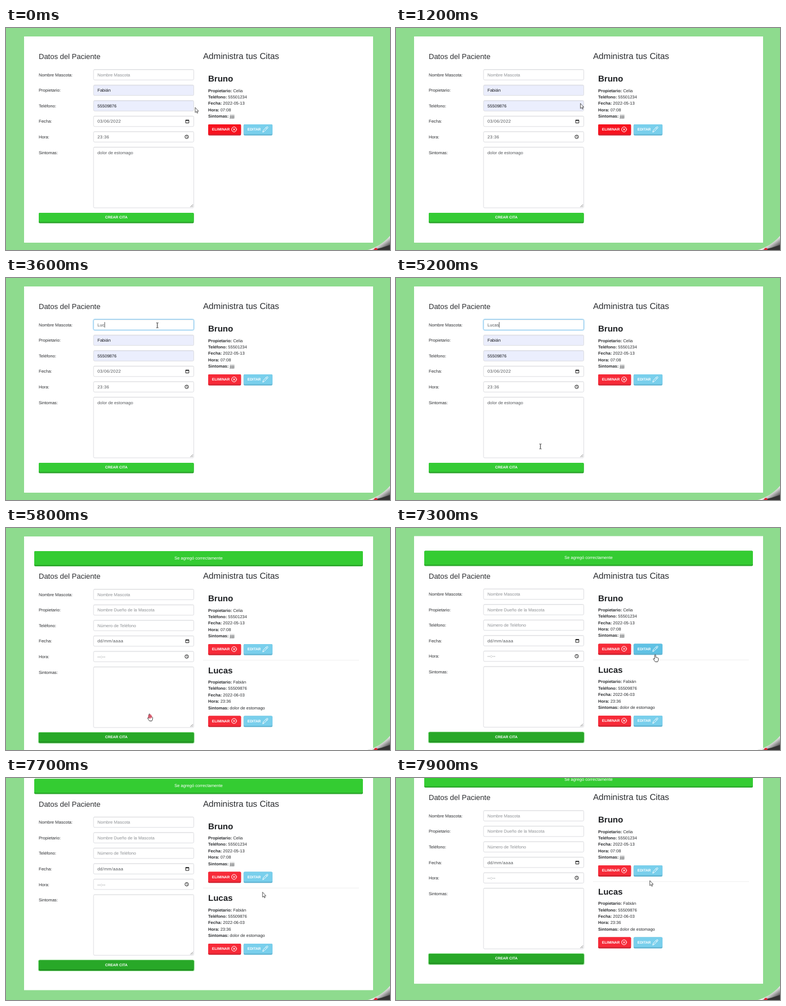
These frames come from a looping animation (680x394 px, 8000 ms). An HTML page:

```html
<!DOCTYPE html>
<html lang="es">
<head>
<meta charset="utf-8">
<title>Citas</title>
<style>
html, body { margin: 0; width: 100%; height: 100%; overflow: hidden; background: #8edb8e; }
svg { display: block; width: 680px; height: 394px; }
text { font: 7.6px "Liberation Sans", Arial, sans-serif; fill: #2b2d30; text-rendering: geometricPrecision; white-space: pre; }
.h1 { font-size: 13px; }
.h2 { font-size: 15.15px; }
.pet { font-size: 15px; font-weight: bold; fill: #1f2124; }
.info { font-size: 7.5px; }
.info tspan { font-weight: bold; }
.btn { font-size: 6.5px; font-weight: bold; fill: #fff; }
.value { fill: #55585c; }
.hint { fill: #8c8f93; }
.auto { fill: #16181c; }
.time { letter-spacing: .36px; }
.white { fill: #fff; }
.menu { font-size: 7.1px; fill: #f1f1f2; }
.field { fill: #fff; stroke: #dcdde1; stroke-width: 1; }
.line { fill: none; stroke: #fff; stroke-width: 1; stroke-linecap: round; stroke-linejoin: round; }
.icon { fill: none; stroke: #222; stroke-width: 1; }
</style>
</head>
<body>
<svg id="stage" viewBox="0 0 680 394" xmlns="http://www.w3.org/2000/svg"></svg>
<script>
const LOOP = 8000, STEP = 100, ADDED = 5700, SHIFT = 35;
const ROW = 27.55;

const text = (x, y, s, cls = '', extra = '') => `<text x="${x}" y="${y}" class="${cls}" ${extra}>${s}</text>`;
const rect = (x, y, w, h, extra = '') => `<rect x="${x}" y="${y}" width="${w}" height="${h}" ${extra}/>`;

// Button with a darker lower edge
const button = (x, y, w, h, fill, edge, cls = '') =>
  rect(x, y, w, h, `rx="2" fill="${edge}" class="${cls}-edge"`) +
  rect(x, y, w, h - 2.4, `rx="2" fill="${fill}" class="${cls}"`);

function card(y, pet, details, cls) {
  const names = ['Propietario', 'Teléfono', 'Fecha', 'Hora', 'Sintomas'];
  const rows = names.map((n, i) =>
    text(358, 113.6 + i * 11.35, `<tspan>${n}:</tspan> ${details[i]}`, 'info')).join('');
  return `<g transform="translate(0 ${y})">${text(358, 95.3, pet, 'pet')}${rows}
    ${button(358, 171, 58.2, 19.8, '#f72a38', '#cf2431', 'del')}
    ${text(364.8, 182.2, 'ELIMINAR', 'btn')}
    <g class="line"><circle cx="403.9" cy="180" r="4.4"/><path d="M402.3 178.4l3.2 3.2m0-3.2l-3.2 3.2"/></g>
    ${button(420.8, 171, 51, 19.8, '#79cfec', '#62b5d3', cls)}
    ${text(427.6, 182.2, 'EDITAR', 'btn')}
    <path class="line" d="M454.8 184.6l.8-3 6-6q1-.8 1.8 0 .9.9 0 1.8l-6 6zM460.4 176.8l1.9 1.9"/></g>`;
}

function form() {
  const labels = ['Nombre Mascota:', 'Propietario:', 'Teléfono:', 'Fecha:', 'Hora:', 'Sintomas:'];
  let out = text(58, 55.2, 'Datos del Paciente', 'h1') + text(349, 55.4, 'Administra tus Citas', 'h2');
  labels.forEach((label, i) => {
    const y = 73.6 + i * ROW;
    out += text(58, y + 12.2, label);
    out += rect(155, y, 177.5, i < 5 ? 18.6 : 107.8, `rx="2" class="field" id="box${i}"`);
    out += `<path d="M156 ${y + .9}h175.5" stroke="#000" stroke-opacity=".05"/>`;
    out += text(162, y + 12.2, '', '', `id="val${i}"`);
  });
  return out + rect(162, 78.2, .8, 9.8, 'id="caret" fill="#333"') +
    `<g class="icon"><path d="M318.2 163.4h5.6v5.2h-5.6z"/><path d="M318 163.8h6" stroke-width="1.8"/>
      <circle cx="320" cy="193.1" r="3.1"/><path d="M320 191v2.3l1.5.9" stroke-width=".8"/>
      <path d="M326.5 317.8l4.6-4.6m-2 4.6l2-2" stroke="#666" stroke-width=".8"/></g>` +
    rect(56.8, 327, 277, 20.6, 'rx="3" id="glow" fill="#9be79b"') +
    button(58, 328, 274.6, 18.4, '#34cb34', '#2ba52b', 'create') +
    text(195.4, 338.4, 'CREAR CITA', 'btn', 'text-anchor="middle"');
}

const stage = document.getElementById('stage');
stage.innerHTML = `
<defs>
  <linearGradient id="fold" gradientUnits="userSpaceOnUse" x1="657" y1="379" x2="668" y2="394">
    <stop offset="0" stop-color="#a9b3a9"/><stop offset=".28" stop-color="#f4f4f4"/>
    <stop offset=".6" stop-color="#aeaeae"/><stop offset="1" stop-color="#555"/>
  </linearGradient>
</defs>
${rect(0, 0, 680, 394, 'fill="#8edb8e"')}
<g id="page">
  ${rect(32, 15, 618, 366, 'fill="#fff" id="panel"')}
  <g id="alert">${button(50, 41, 582, 27, '#34cc32', '#2ba82b')}
    ${text(341, 55.7, 'Se agregó correctamente', 'white', 'text-anchor="middle"')}</g>
  <g id="content">${form()}
    ${card(0, 'Bruno', ['Celia', '55501234', '2022-05-13', '07:08', 'jjjjj'], 'edit')}
    <g id="second">${rect(349, 199.3, 276, .8, 'fill="#ececec"')}
      ${card(127.5, 'Lucas', ['Fabián', '55509876', '2022-06-03', '23:36', 'dolor de estomago'], 'edit2')}</g>
  </g>
  <g id="menu"><path d="M211 97h6l4-4 4 4h27.5q2 0 2 2v40q0 2-2 2H211q-2 0-2-2V99q0-2 2-2z" fill="#2a2b2f"/>
    ${text(215, 112, 'pedacito', 'menu')}${text(215, 131.4, 'Bruno', 'menu')}</g>
</g>
<g id="corner">
  <path d="M640 394Q663 388 680 369V394Z" fill="url(#fold)"/>
  <path d="M649 394Q664 391 680 385V394Z" fill="#333"/>
  <circle cx="655" cy="393" r="2.8" fill="#d8232f"/>
</g>
<g id="pointer">
  <path id="arrow" d="M0 0v9l2-1.8 1.4 3 1.4-.6-1.4-2.9h2.7z" fill="#fff" stroke="#333" stroke-width=".8"/>
  <path id="beam" d="M-1.8-4.4q1.5 0 1.8.7.3-.7 1.8-.7M0-3.7v7.4M-1.8 4.4q1.5 0 1.8-.7.3.7 1.8.7" fill="none" stroke="#222" stroke-width="1"/>
  <g id="hand"><path d="M-1 .5Q0-.8 1 .5v4l3.4.8q1.5.4 1.4 2l-.6 3.2-.9 2H.2L-3 8.2q-.8-1.5.6-1.7L-1 7.8z" fill="#fff" stroke="#333" stroke-width=".9"/></g>
  <circle id="click" cx="1" cy="4.5" r="3.5" fill="#e0304a" fill-opacity=".65"/>
</g>`;

const el = id => document.getElementById(id);
const show = (id, on) => el(id).setAttribute('display', on ? 'inline' : 'none');
const move = (id, x, y) => el(id).setAttribute('transform', `translate(${x} ${y})`);
const paint = (cls, fill) => document.querySelectorAll('.' + cls).forEach(e => e.setAttribute('fill', fill));
const within = (t, a, b) => t >= a && t < b;

// [time, x, y]
const path = [
  [0, 335, 141], [1000, 335, 141], [1900, 268, 84], [4500, 268, 84], [5400, 254, 330], [5800, 254, 330],
  [6500, 446, 238], [7000, 459, 225], [7300, 459, 225], [7400, 459, 223], [7500, 459, 223], [7900, 449.5, 182]
];
const shapes = [[0, 'arrow'], [1300, 'beam'], [5300, 'hand'], [6000, 'beam'], [6300, 'arrow'], [6700, 'hand'], [7400, 'arrow']];
const typing = [[0, ''], [2800, 'L'], [3100, 'Lu'], [3600, 'Luc'], [3700, 'Luca'], [3900, 'Lucas']];
const scroll = [[7200, 0], [7300, .6], [7400, 8.5], [7500, 19.4], [7600, 30], [7700, 39.5], [7800, 46.5], [7900, 50.9]];

const held = (table, t) => table.filter(k => k[0] <= t).pop()[1];

function tween(table, t, col, ease = u => u) {
  const i = table.findIndex(k => k[0] > t);
  if (i === 0) return table[0][col];
  if (i < 0) return table[table.length - 1][col];
  const a = table[i - 1], b = table[i];
  return a[col] + (b[col] - a[col]) * ease((t - a[0]) / (b[0] - a[0]));
}
const smooth = u => u * u * (3 - 2 * u);

const filled = [
  ['', 'value'], ['Fabián', 'auto'], ['55509876', 'auto'],
  ['03/06/2022', 'value time'], ['23:36', 'value time'], ['dolor de estomago', 'value']
];
const empty = [
  ['Nombre Mascota', 'hint'], ['Nombre Dueño de la Mascota', 'hint'], ['Número de Teléfono', 'hint'],
  ['dd/mm/aaaa', 'value time'], ['--:--', 'value time'], ['', 'value']
];

function draw(t) {
  const done = t >= ADDED, focus = within(t, 1700, 5600), name = held(typing, t);

  (done ? empty : filled).forEach(([s, cls], i) => {
    const v = el('val' + i);
    if (i === 0) [s, cls] = !done && name ? [name, 'value'] : empty[0];
    if (v.textContent !== s) v.textContent = s;
    v.setAttribute('class', cls);
  });
  for (const i of [1, 2]) el('box' + i).style.fill = done ? '#fff' : '#ebeefd';
  el('box0').style.stroke = focus ? '#86c5ec' : '';
  el('box0').style.filter = focus ? 'drop-shadow(0 0 1.2px #8ed0f5)' : '';

  const blink = within(t, 2600, 4400) || within(t, 4900, 5500);
  show('caret', blink);
  el('caret').setAttribute('x', 162.2 + (name && !done ? el('val0').getComputedTextLength() : 0));

  show('menu', within(t, 2000, 2800));
  show('alert', done);
  show('second', done);
  show('glow', done);
  paint('create', done ? '#28a828' : t >= 5400 ? '#2cb42c' : '#34cb34');
  paint('create-edge', done ? '#219021' : '#2ba52b');
  paint('del', t < 1500 ? '#f7131f' : '#f72a38');
  paint('edit', within(t, 6700, 7400) ? '#5fc1e4' : '#79cfec');

  el('panel').setAttribute('height', done ? 401 : 366);
  move('content', 0, done ? SHIFT : 0);
  move('page', 0, -tween(scroll, t, 1));
  move('pointer', tween(path, t, 1, smooth), tween(path, t, 2, smooth));
  const shape = held(shapes, t);
  for (const id of ['arrow', 'beam', 'hand']) show(id, id === shape);
  show('click', within(t, 5700, 5900));
}

const start = performance.now();
let last = -1;
function tick() {
  const t = Math.floor((performance.now() - start) % LOOP / STEP) * STEP;
  if (t !== last) draw(last = t);
  requestAnimationFrame(tick);
}
tick();
</script>
</body>
</html>
```
